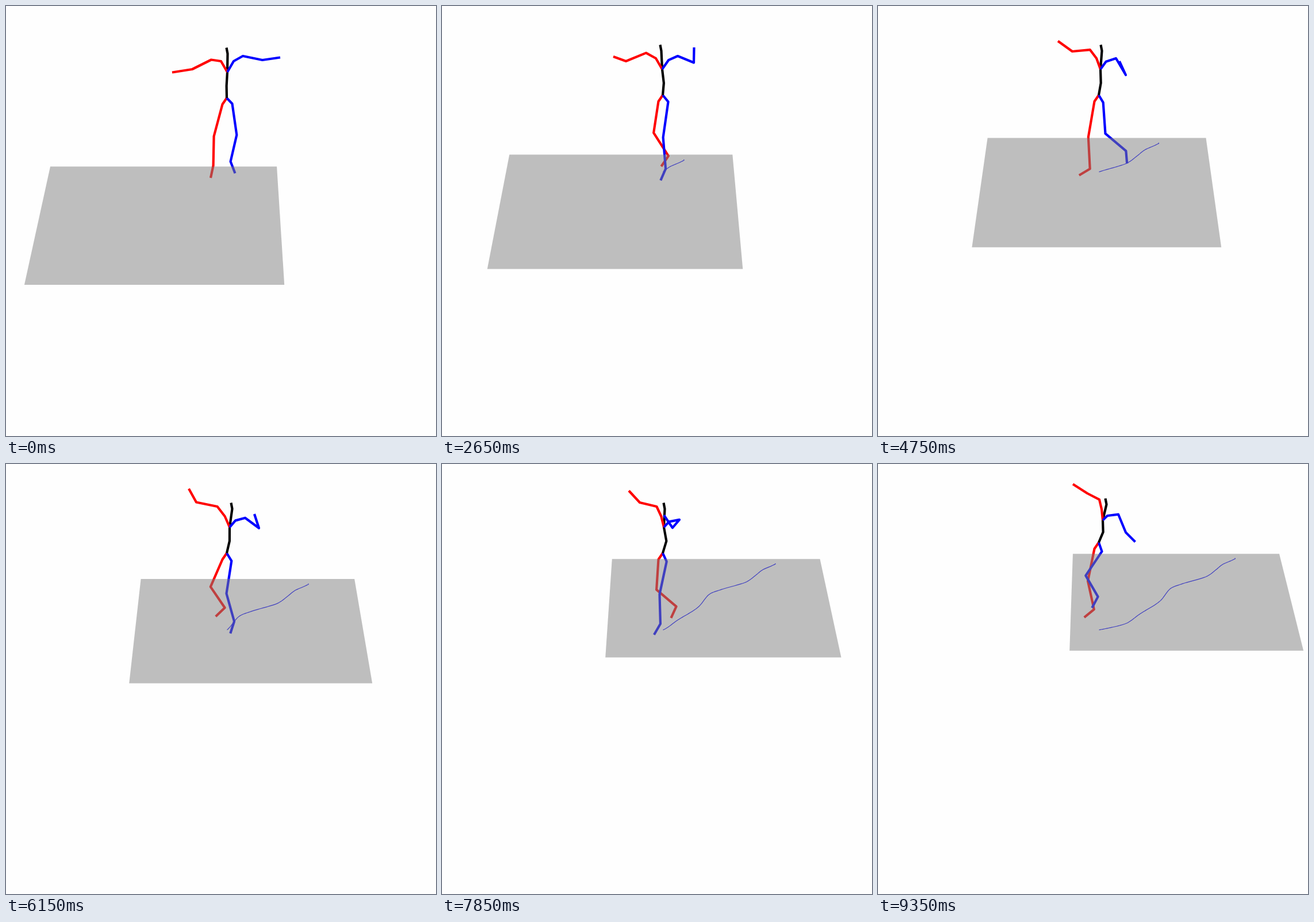
An HTML page that plays this animation: 748x748 px, repeating every 9.4 s.

```html
<!DOCTYPE html>
<html lang="en">
<head>
<meta charset="utf-8">
<title>Walking figure</title>
<style>
html, body { margin: 0; width: 100%; height: 100%; overflow: hidden; background: #fefefe; }
svg { display: block; width: 100%; height: 100%; }
polyline { fill: none; stroke-width: 4.2; stroke-linejoin: round; }
#trail { stroke: #00f; stroke-width: 1.2; }
#floor { fill: #808080; fill-opacity: .5; }
</style>
</head>
<body>
<svg id="stage" viewBox="0 0 748 748"></svg>
<script>
const LOOP = 9400, STEP = 50;

// time, distance walked sideways and in depth
const walk = [
  [0, 0, 0], [950, -.0006, .004], [1400, .0052, .025], [1900, .018, .066],
  [2850, .0282, .122], [3800, .0413, .188], [4750, .0766, .2675], [5330, .0906, .307],
  [6150, .107, .435], [7200, .134, .557], [7850, .1519, .643], [8550, .1733, .683],
  [9350, .1855, .7]
];
// time, lean, turn, right elbow and hand, left elbow and hand
const poses = [
  [0, 1, 0, 324,110, 289,115.5, 446,94, 477,89.5],
  [1400, .5, 0, 318,97, 286,90, 436,92, 433,81],
  [2650, -1, 0, 320,96, 298,88, 438,98.5, 438.5,72],
  [4750, 3, .45, 338,79, 313,61, 431,120, 420,96],
  [6150, 5, .3, 331,66.5, 318,43, 440,111.5, 432,87],
  [7850, 2, .7, 344,67, 325,46.5, 401,111, 386,89],
  [9350, 7, 1, 364,51, 339,35, 431,119, 447.5,135.5]
];
// lift time, landing time, footprint on the floor
const rightSteps = [
  [0, 1, 356, 299], [300, 1200, 347, 300], [2500, 4350, 243, 347],
  [5700, 6600, 188, 394], [7800, 8450, 100, 404]
];
const leftSteps = [
  [0, 1, 398.5, 291], [1350, 1950, 344, 325], [4500, 5450, 241, 380],
  [6700, 7400, 157, 423], [8700, 10000, 70, 392]
];

const mix = (a, b, u) => a + (b - a) * u;
const ramp = (t, a, b) => Math.min(1, Math.max(0, (t - a) / (b - a)));
const ease = (t, a, b) => { const u = ramp(t, a, b); return u * u * (3 - 2 * u); };

// Tangent of column c at row i that never overshoots.
function tangent(rows, i, c) {
  if (i < 1 || i > rows.length - 2) return 0;
  const [p, q, r] = [rows[i - 1], rows[i], rows[i + 1]];
  const a = (q[c] - p[c]) / (q[0] - p[0]), b = (r[c] - q[c]) / (r[0] - q[0]);
  return a * b > 0 ? 2 * a * b / (a + b) : 0;
}

function sample(rows, t) {
  let i = 0;
  while (i < rows.length - 2 && rows[i + 1][0] <= t) i++;
  const p = rows[i], q = rows[i + 1], h = q[0] - p[0];
  const u = ramp(t, p[0], q[0]), w = 1 - u;
  return p.slice(1).map((v, k) => {
    const c = k + 1;
    return v * w * w * (1 + 2 * u) + q[c] * u * u * (3 - 2 * u)
      + h * u * w * (w * tangent(rows, i, c) - u * tangent(rows, i + 1, c));
  });
}

// Perspective of a floor point: sideways slope and inverse depth.
function project(side, depth) {
  const s = 1e4 / depth;
  return [382 + side * s, s - 1110];
}

// Toes rest on footprints that drift with the floor and swing in an arc between them.
function toePoint(steps, t, [side, depth]) {
  let [, , x, y] = steps[0], lift = 0;
  for (const [up, down, nx, ny] of steps.slice(1)) {
    const u = ease(t, up, down);
    x = mix(x, nx, u);
    y = mix(y, ny, u);
    lift += 20 * Math.sin(Math.PI * ramp(t, up, down)) ** 3;
  }
  return [x + 1395 * side, y - 196 * depth - lift];
}

// Knee between hip and ankle, pushed out as the leg shortens.
function kneePoint([hx, hy], [ax, ay], facing) {
  const thigh = 57, shin = 50, dx = ax - hx, dy = ay - hy, d = Math.hypot(dx, dy);
  const along = d < thigh + shin
    ? (d * d + thigh * thigh - shin * shin) / (2 * d)
    : d * thigh / (thigh + shin);
  const bend = facing * (6.5 + .5 * Math.sqrt(Math.max(0, thigh * thigh - along * along)));
  const out = d < thigh + shin ? bend : 6.5 * facing;
  return [hx + (dx * along - dy * out) / d, hy + (dy * along + dx * out) / d];
}

function leg(hip, toe, splay, profile, facing) {
  const dx = splay - .2 * (toe[0] - 384) - 13 * (1 - profile);
  const ankle = [toe[0] + dx, toe[1] - Math.sqrt(Math.max(80, 484 - dx * dx))];
  return [hip, kneePoint(hip, ankle, facing), ankle, toe];
}

function figure(t, root) {
  const s = t / 1000;
  const [lean, turn, rex, rey, rhx, rhy, lex, ley, lhx, lhy] = sample(poses, t);
  const rise = ease(t, 7850, 9350), profile = ease(t, 0, 2400);
  const x = 384, y = 160 - 5 * ease(t, 1400, 2650) - 18.5 * rise;
  const tall = 1 - .14 * rise;
  const pelvis = [x, y], chest = [x + lean, y - 45 * tall];
  const neck = [x + 2 * lean - .5, y - 77 * tall];
  const fromChest = (dx, dy) => [chest[0] + dx, chest[1] + dy];

  return {
    rightLeg: [pelvis, ...leg([x - 7.5, y + 11], toePoint(rightSteps, t, root), 12, profile, 1)],
    leftLeg: [pelvis, ...leg([x + 9.5 - 4 * turn, y + 10 + .6 * s],
      toePoint(leftSteps, t, root), 8, profile, mix(-.6, 1, profile))],
    spine: [pelvis, [x - .4 + .86 * s, y - 21 * tall], chest, neck, [neck[0] - 2, neck[1] - 10.5]],
    rightArm: [chest, fromChest(9 * turn - 11, -19),
      fromChest(22 * turn - 28, Math.max(-36, -21.5 - 2.6 * s)), [rex, rey], [rhx, rhy]],
    leftArm: [chest, fromChest(11 - 3 * turn, 1.2 * s - 19),
      fromChest(27, 1.9 * s - 28).map((v, i) => i ? v : Math.min(v, lex + 4 + 60 * (1 - turn) + 40 * rise)),
      [lex, ley], [lhx, lhy]]
  };
}

const stage = document.getElementById("stage");
function add(tag, attrs) {
  const el = document.createElementNS("http://www.w3.org/2000/svg", tag);
  for (const k in attrs) el.setAttribute(k, attrs[k]);
  return stage.appendChild(el);
}
const plot = (el, pts) => el.setAttribute("points", pts.flat().map(n => n.toFixed(2)).join(" "));

const trail = add("polyline", { id: "trail" });
const colors = { rightLeg: "#f00", leftLeg: "#00f", spine: "#000", rightArm: "#f00", leftArm: "#00f" };
const limbs = {};
for (const name in colors) limbs[name] = add("polyline", { stroke: colors[name] });
const ground = add("polygon", { id: "floor" });

const route = [];
for (let t = 0; t < LOOP; t += STEP) route.push(sample(walk, t));

function draw(n) {
  const root = route[n], [side, depth] = root;
  const body = figure(n * STEP, root);
  for (const name in limbs) plot(limbs[name], body[name]);

  plot(trail, route.slice(0, n + 1).map(([x, z]) => project(.0018 + side - x, 7.15 + depth - z)));

  const left = side - .2195, right = left + .2836, far = depth + 7.198, near = far - .928;
  plot(ground, [project(left, far), project(right, far), project(right, near), project(left, near)]);
}

function tick() {
  draw(Math.floor(performance.now() % LOOP / STEP));
  requestAnimationFrame(tick);
}
tick();
</script>
</body>
</html>
```
